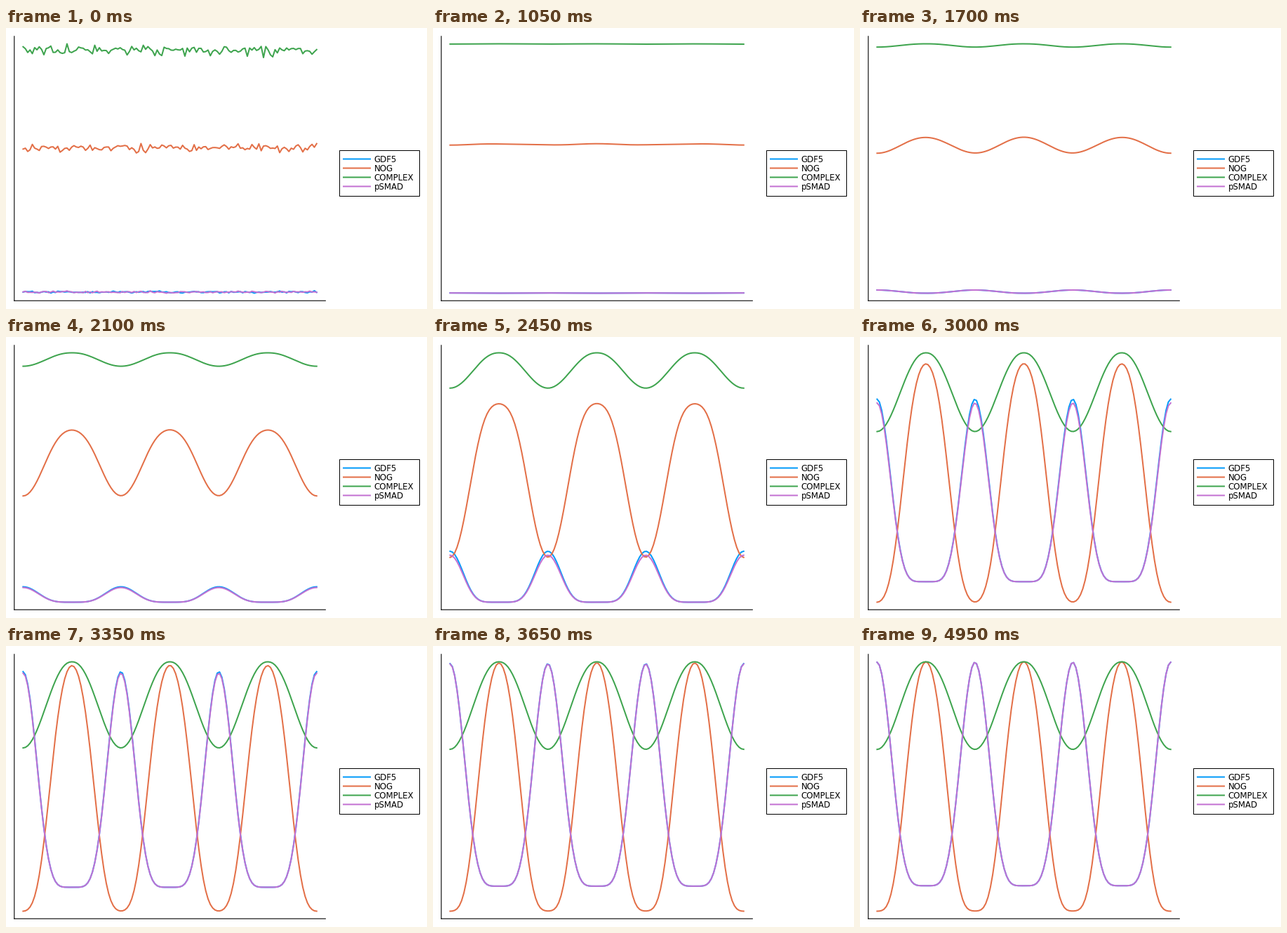
These frames come from a looping animation (600x400 px, 5.05 s). A matplotlib script:

```python
import numpy as np
import matplotlib.pyplot as plt
from matplotlib.animation import FuncAnimation
from matplotlib.patches import Rectangle

W, H, DPI = 600, 400, 100
PX = 72 / DPI                      # points per pixel
FRAMES, INTERVAL, STEP = 101, 50, 65
LEFT, RIGHT, TOP, BOTTOM = 24.35, 442.75, 22.5, 377.5

NAMES = ["GDF5", "NOG", "COMPLEX", "pSMAD"]
COLORS = ["#009AFA", "#E36F47", "#3EA44E", "#C371D2"]

# Pattern growth: logit of each amplitude at a few simulation steps
KEYS = [0, 26, 37, 46, 56, 76]
GROWTH = {
    "gdf": [-11.5, -4.35, -1.36, 1.37, 4.8, 6.2],
    "smad": [-11.5, -4.35, -1.46, 1.27, 4.6, 6.2],
    "complex": [-10.0, -3.36, -0.57, 1.97, 5.3, 6.2],
    "nog_up": [-9.8, -2.60, -0.03, 1.98, 4.2, 6.2],
    "nog_down": [-10.2, -2.96, 0.35, 3.33, 5.65, 7.3],
}
POWER = [1, 1.15, 3.0, 2.85, 2.5, 2.45]      # sharpness of GDF5 peaks
SKEW = [0, 0.05, 0.5, -0.19, -0.5, -0.54]    # lopsidedness of NOG
FLAT = [0, 0, 0.15, 0.38, 0.38, 0.38]        # flatness of NOG extremes

N = 128
x = np.linspace(0, 1, N)
xs = LEFT + (RIGHT - LEFT) * x
trough = (1 + np.cos(6 * np.pi * x)) / 2
crest = 1 - trough

# Starting noise, split into cosine modes that diffuse away
modes = np.arange(N)
basis = np.cos(np.pi * np.outer(x, modes))
rng = np.random.default_rng(12)
noise = rng.normal(size=(4, N)) * np.array([[0.0021], [0.0088], [0.0100], [0.0021]])
weights = np.linalg.solve(basis, noise.T)


def at(k, values):
    return np.interp(k, KEYS, values)


def amount(k, name):
    return 1 / (1 + np.exp(-at(k, GROWTH[name])))


def curves(k):
    """Pixel heights of the four curves at simulation step k."""
    decay = np.exp(-(0.12 + 0.002 * modes**2) * k)
    rest = (basis @ (weights * decay[:, None])).T

    peak = trough ** at(k, POWER)
    bend = crest * (1 - crest)
    wave = crest + bend * (at(k, SKEW) + at(k, FLAT) * (2 * crest - 1))
    low = 0.597 - 0.7105 * amount(k, "nog_down")
    high = 0.597 + 0.404 * amount(k, "nog_up")

    values = rest + np.array([
        amount(k, "gdf") * peak,
        low + (high - low) * wave - 0.0006 * np.cos(10 * np.pi * x),
        1 - 0.392 * amount(k, "complex") * trough**1.12,
        amount(k, "smad") * peak,
    ])
    lo, hi = values.min(), values.max()
    return TOP + (BOTTOM - TOP) * (hi - values) / (hi - lo)


fig = plt.figure(figsize=(W / DPI, H / DPI), dpi=DPI, facecolor="white")
ax = fig.add_axes([0, 0, 1, 1])
ax.set_xlim(0, W)
ax.set_ylim(H, 0)
ax.axis("off")

# Axis lines
for px, py in [((11.8, 11.8), (11.8, 388.2)), ((11.8, 455.3), (388.2, 388.2))]:
    ax.plot(px, py, color="black", lw=1.1 * PX, snap=False)

lines = [ax.plot(xs, xs, color=c, lw=2 * PX)[0] for c in COLORS]

# Legend
ax.add_patch(Rectangle((474.5, 173.5), 114, 65, fc="white", ec="black", lw=PX))
for i, (name, color) in enumerate(zip(NAMES, COLORS)):
    y = 186.5 + 13 * i
    ax.plot([480, 520], [y, y], color=color, lw=2 * PX,
            solid_capstyle="butt", snap=False)
    ax.text(524.5, y + 4.4, name, fontsize=11.8 * PX, family="DejaVu Sans",
            color="black", va="baseline")


def update(frame):
    for line, y in zip(lines, curves(frame * INTERVAL // STEP)):
        line.set_ydata(y)
    return lines


anim = FuncAnimation(fig, update, frames=FRAMES, interval=INTERVAL,
                     repeat=True, repeat_delay=0)
plt.show()
```
